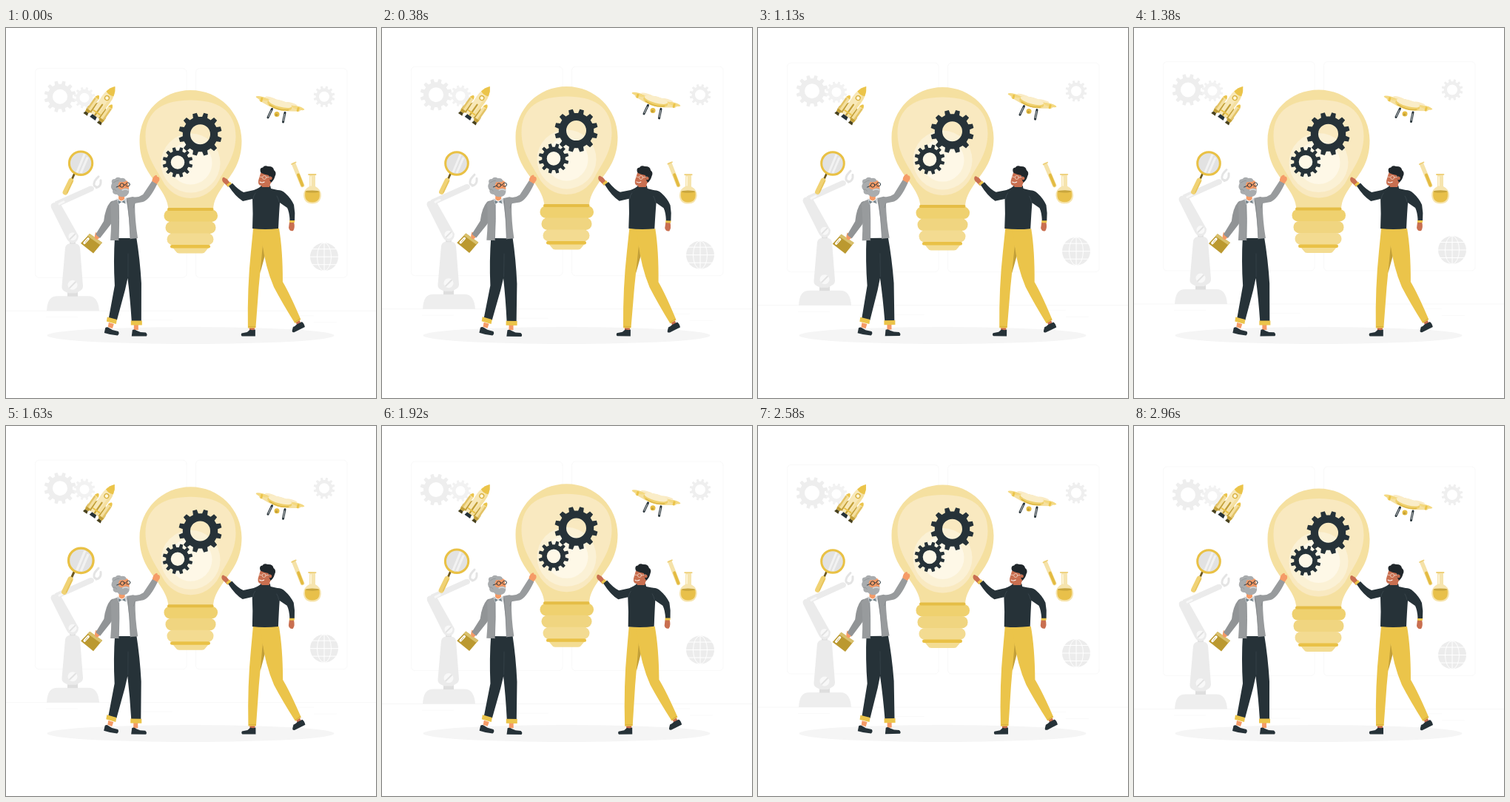
Animation, 500 px wide and 500 px high, one loop 3 s. Source, as an HTML page with a canvas:

```html
<!DOCTYPE html>
<html lang="en">
<head>
<meta charset="utf-8">
<title>Bright idea</title>
<style>
html, body { margin: 0; width: 100%; height: 100%; overflow: hidden; background: #fff; }
canvas { display: block; width: 500px; height: 500px; }
</style>
</head>
<body>
<canvas id="stage"></canvas>
<script>
const canvas = document.getElementById('stage');
const ctx = canvas.getContext('2d');
const dpr = window.devicePixelRatio || 1;
canvas.width = canvas.height = 500 * dpr;

const LOOP = 3000, LEAD = 40;
const DARK = '#263238', GOLD = '#ebc44a', DEEP = '#c29f38';
const PALE = '#f5e0a0', CREAM = '#faebc4', GREY = '#ebebeb';
const OLD = '#f59b67', YOUNG = '#c96f50';

function fill(d, color) { ctx.fillStyle = color; ctx.fill(new Path2D(d)); }
function line(d, color, w, cap = 'round') {
  ctx.strokeStyle = color;
  ctx.lineWidth = w;
  ctx.lineCap = cap;
  ctx.lineJoin = 'round';
  ctx.stroke(new Path2D(d));
}
function oval(x, y, rx, ry, color, turn = 0) {
  ctx.beginPath();
  ctx.ellipse(x, y, rx, ry, turn, 0, 7);
  ctx.fillStyle = color;
  ctx.fill();
}
const dot = (x, y, r, color) => oval(x, y, r, r, color);
function ring(x, y, r, color, w) {
  ctx.beginPath();
  ctx.arc(x, y, r, 0, 7);
  ctx.strokeStyle = color;
  ctx.lineWidth = w;
  ctx.stroke();
}
function box(x, y, w, h, r, color) {
  ctx.beginPath();
  ctx.roundRect(x, y, w, h, r);
  ctx.fillStyle = color;
  ctx.fill();
}
function group(dx, dy, draw) {
  ctx.save();
  ctx.translate(dx, dy);
  draw();
  ctx.restore();
}
function spin(x, y, deg, draw) {
  ctx.save();
  ctx.translate(x, y);
  ctx.rotate(deg * Math.PI / 180);
  ctx.translate(-x, -y);
  draw();
  ctx.restore();
}
function gear(x, y, outer, root, hole, color) {
  const n = 12, step = 2 * Math.PI / n;
  ctx.beginPath();
  for (let i = 0; i < n; i++) {
    const a = (i + 0.5) * step;
    for (const [off, r] of [[-0.29, root], [-0.19, outer], [0.19, outer], [0.29, root]]) {
      ctx.lineTo(x + r * Math.cos(a + off * step), y + r * Math.sin(a + off * step));
    }
  }
  ctx.closePath();
  ctx.moveTo(x + hole, y);
  ctx.arc(x, y, hole, 0, 7);
  ctx.fillStyle = color;
  ctx.fill('evenodd');
}

// Motion: linear swings between a few stops.
const rise = p => 1 - Math.abs(2 * p - 1);
function track(p, stops) {
  for (let i = 1; i < stops.length; i++) {
    const [a, u] = stops[i - 1], [b, v] = stops[i];
    if (p <= b) return u + (v - u) * (p - a) / (b - a);
  }
  return stops[stops.length - 1][1];
}
const sway = p => track(p, [[0, 0], [.25, 1], [.75, -1], [1, 0]]);
const beat = p => track(p, [[0, 1], [.14, 1.12], [.28, 1], [.42, 1.12], [.7, 1], [1, 1]]);

function backdrop() {
  ctx.strokeStyle = '#f9f9f9';
  ctx.lineWidth = 1;
  for (const x of [39.5, 256.5]) {
    ctx.beginPath();
    ctx.roundRect(x, 55, 204.5, 282.5, 5);
    ctx.stroke();
  }
  line('M0 382.5H500', '#f7f7f7', 1, 'butt');
  line('M54 391H97M170 395H225M382 389H416M416 398H447', '#fafafa', 1, 'butt');

  gear(73, 93, 21.5, 17, 10, '#eeeeee');
  gear(106, 94.5, 14.5, 11.3, 6.5, '#f2f2f2');
  gear(430, 93, 14.5, 11.3, 7, '#efefef');

  dot(430, 309.5, 19, '#ececec');
  line('M430 290V329M411 309.5H449M414 299H446M414 320H446', '#fff', 1);
  ctx.beginPath();
  ctx.ellipse(430, 309.5, 9.5, 19, 0, 0, 7);
  ctx.stroke();
}

function screw(x, y, r) {
  dot(x, y, r, '#f8f8f8');
  line(`M${x - r * .6} ${y + r * .6}L${x + r * .6} ${y - r * .6}`, '#e2e2e2', 2);
}
function robot() {
  fill('M55 382.5C56 368 60 362.5 70 362.5H111C121 362.5 125 370 126 382.5Z', '#eeeeee');
  box(83, 357, 14, 6, 0, '#dedede');
  fill('M80 297Q81 291 90 291Q99 291 100 297L104 349Q104 354 99 356L95 358.5H84L79 356Q75 354 75.5 349Z', GREY);
  box(86, 286, 8, 6, 1, '#e0e0e0');
  fill('M61 243Q59 237 66 236Q73 235 76 242L98 281Q98 289 91 291Q85 291 82 285Z', GREY);
  fill('M66 235L113 214Q118 213 119 217Q119 220 116 221L74 240Q67 242 66 235Z', GREY);
  line('M122 215Q117 214 120 207Q122 204 125 201M122 216Q127 215 128 210V206', '#e4e4e4', 3);
  line('M72 238L78 235', '#f7f7f7', 3);
  screw(90, 282, 5.5);
  screw(90, 347.5, 6.5);
}

function bulb() {
  fill('M249.5 84.5C211 84.5 180.5 115 180.5 153C180.5 182 193 197 205 213C214 226 218.5 234 219.5 246H280C280.5 234 285 226 294 213C306 197 318.5 182 318.5 153C318.5 115 288 84.5 249.5 84.5Z', PALE);
  fill('M249.5 98C214 98 188.5 111 188.5 147C189 174 202 189 211 206C219 222 234 230.5 249.5 230.5C265 230.5 280 222 288 206C297 189 310 174 310.5 147C310.5 111 285 98 249.5 98Z', '#f9e9c0');
  dot(249.5, 183, 40, '#fbf1d5');
  dot(249.5, 183, 29, '#fef8e7');
  gear(262.5, 144.2, 29.3, 23.8, 13.5, DARK);
  gear(232, 182, 20.5, 15.8, 9.3, DARK);

  box(213.5, 246, 72.5, 16.5, 8, '#efd16f');
  box(215.5, 262, 68, 16.5, 8, '#f0d580');
  box(217.5, 278, 63, 16, 8, '#f3db91');
  box(218, 243.5, 62.5, 4, 2, '#e5bd45');
  fill('M225 297H274L269 303Q268 305 265 305H234Q231 305 230 303Z', '#f3dc92');
  box(222, 293.5, 54, 4.5, 2.2, '#e9c146');
}

function oldMan(reach) {
  // shoes and legs
  fill('M139 398L146 400L144 406L138 404ZM173 400H179V408H173Z', OLD);
  fill('M134.5 405Q137 403.5 139 405L144 408L152 410Q154 413 151 415.5Q142 415 133 412Z', DARK);
  fill('M171 408Q174 406.5 177 409L182 411L189 411.5Q192 414 190 416.5H170Z', DARK);
  fill('M147 282H176Q181 312 183 345L183 397H170Q168 366 164.5 338L161 354L150 395L139 392L147 348Q145 315 147 282Z', DARK);
  line('M165 336V305', '#39464d', .7);
  fill('M137 390.5L150 394L149 400L136 396.5ZM169 395.5H184V401.5H169Z', GOLD);

  // book and resting arm
  fill('M113 278L130 290L118 304.5L101 291Z', '#bb9930');
  fill('M113 278L130 290L127 293L110 281Z', '#d9c06c');
  line('M106 290.5L111 285', '#fff', 3.4);
  line('M107 290L110 286', DEEP, .7);
  fill('M121 276L127 280Q127 285 122 286Q119 284 120 280Z', OLD);
  fill('M141 235Q147 231 150 238Q148 257 141 266L127 284L121 279L132 261Q134 243 141 235Z', '#919496');

  // shirt, raised arm and cardigan
  const up = 2 * reach;
  fill('M149 232L167 230Q171 256 169 284H150Z', '#fff');
  fill('M152 222H160V231Q156 236 152 231Z', OLD);
  fill('M146 233L152 231Q153 260 152 287L141 287Q143 260 141 238Z', '#989b9d');
  group(0, -up, () =>
    fill('M197 209Q197 202 201 199.5Q204 197.5 204 201Q208 201 207 206L203 212Z', OLD));
  fill(`M162 230L171 228Q178 230 185 225L197 ${207 - up}L204 ${211 - up}Q194 232 185 235L174 237Q174 260 178 284L168 285Q167 256 162 230Z`, '#989b9d');
  line('M152 233Q153 259 152 287M164 233Q167 257 168 285', '#83878a', .8);
  line('M174 237L172 243', '#83878a', .8);
  fill('M149 230L156 235L152 239ZM163 229L156 235L162 238Z', '#cfd3d6');
  fill('M151 233L156 235L152 237.5ZM156 235L160 233L161 237Z', '#728087');

  // head
  fill('M149 207Q156 202 164 207L166 216Q166 224 158 226Q150 226 149 218Z', OLD);
  fill('M143 210Q141 204 147 204Q150 200 155 203Q161 202 162 207Q157 209 153 208Q151 211 151 215Q153 219 157 218Q162 215 166 218Q167 226 160 228Q153 229 150 225Q143 225 144 219Q140 215 143 210Z', '#a9acae');
  line('M145 209Q149 206 152 206M144 218Q147 217 149 220', '#8f9395', .8);
  line('M157 219Q161 217 165 219', '#d8dadb', 1.5);
  ring(156.5, 212.5, 2.7, DARK, .9);
  ring(164.5, 211.5, 2.6, DARK, .9);
  line('M149 215L154 213M159 212H162', DARK, .9);
  line('M162 212V215', '#d97d4e', 1);
}

function youngMan(reach) {
  // shoes and legs
  fill('M329 403H336V410H329ZM391 396L396 393L399 400L394 403Z', YOUNG);
  fill('M330 407.5Q333 409 337 407.5V416.5H319Q317 415 318.5 412.5L326 411Z', DARK);
  fill('M388 404Q391 403 393 400.5L400 397Q403 399 404 404Q396 408 390 411Q386 412 387 408Z', DARK);
  fill('M346 288L350 307L343.5 331L342 318Z', DEEP);
  fill('M334 271H357L347 293Q341 350 337.5 405.5H327Q326 350 331 302Z', GOLD);
  fill('M344 271H369Q374 300 374 343Q384 360 398.5 394L390.5 399Q373 371 362 350Q350 322 346 288Z', GOLD);
  line('M328 403.5H337M391 397L397 393', '#d6af3a', 1);

  // far hand and arm
  fill('M383 262H389Q391 270 388 274Q383 275 382 270Z', YOUNG);
  box(383, 259, 7, 4, 1, GOLD);
  fill('M361 220Q371 217 377 223Q385 230 389 239Q391 250 390 260H383.5Q383 249 380 243L367 234Z', DARK);

  // raised arm and torso
  const dx = -1.5 * reach, dy = -3 * reach;
  group(dx, dy, () => {
    fill('M295 210Q291 207 292.5 203Q294 201 296 203Q299 204 300 206L304 211L300 215Z', YOUNG);
    fill('M298 212L303 208L305 211L300 215Z', GOLD);
  });
  fill(`M${301 + dx} ${214 + dy}L${306 + dx} ${210 + dy}Q314 219 321 222L335 219Q343 216 345 213H357L358 217L367 219Q372 224 370 236Q369 249 368 271Q350 273 333 271Q334 250 333 231L320 234Q310 228 ${301 + dx} ${214 + dy}Z`, DARK);
  line('M334 231Q334 227 337 223M369 235Q368 230 366 227', '#3b484f', .8);

  // head
  fill('M344 196Q349 192 358 195Q362 204 357 211L356 215H346L345 213Q340 213 341 206Z', YOUNG);
  fill('M344 195Q342 189 347 188.5Q349 185 354 187Q361 186.5 362 192Q366 195 363.5 200Q362 206 358 209L356 205L355 199Q349 198 345 196Z', '#20272b');
  ring(349, 202, 2.5, '#f0d9c9', .8);
  line('M342 201L345.5 201.5M352 202L357 201', '#f0d9c9', .8);
  dot(357.5, 203, 2.2, YOUNG);
  line('M343 208Q346 210 349 208', '#fff', 1);
}

function magnifier() {
  line('M93 196L89 205', '#6f5a1e', 2.8, 'butt');
  line('M88 206L80.5 221.5', '#f0d274', 6.8);
  line('M90 207L83 222', '#e6c35a', 1.5);
  dot(101, 183, 15.5, '#e2e2e2');
  line('M96 195L106 171M101 196L110 175', '#f2f2f2', 3, 'butt');
  ring(101, 183, 15.3, '#e9c145', 3);
}

function rocket() {
  ctx.save();
  ctx.translate(147.5, 79);
  ctx.rotate(35 * Math.PI / 180);
  for (const s of [-1, 1]) {
    ctx.save();
    ctx.scale(s, 1);
    fill('M6 30L14.5 42V48H6Z', DEEP);
    fill('M9 50H13.5L14.5 54H8Z', '#4a431f');
    fill('M8 27Q11 18 14 27V50H8Z', PALE);
    fill('M8 27Q11 18 14 27Z', GOLD);
    fill('M11.5 28H14V50H11.5Z', '#e3c367');
    fill('M8 46H14V50H8Z', DEEP);
    ctx.restore();
  }
  fill('M-3.5 47H3.5L4.5 53H-4.5Z', DARK);
  fill('M0 0Q7.5 9 7 22L6 48H-6L-7 22Q-7.5 9 0 0Z', '#f8e8b8');
  fill('M0 0Q7.5 9 7 22L6 48H2Q5 18 0 0Z', PALE);
  fill('M0 0Q4.5 5 6 12Q0 15 -6 12Q-4.5 5 0 0Z', GOLD);
  dot(0, 19, 3.6, '#d9b23f');
  dot(0, 19, 2.3, '#fff6db');
  line('M0 30V47', DEEP, 2.2);
  line('M-6 43H6', GOLD, 2, 'butt');
  ctx.restore();
}

function drone() {
  line('M359.5 110L354 121.5M377 115L374.5 127.5', DARK, 3);
  line('M358.5 112L354.5 120.5M376.5 117L375 126', '#fff', .8);
  ctx.save();
  ctx.translate(370, 104);
  ctx.rotate(15 * Math.PI / 180);
  fill('M-31 -2L-12 -5H12L31 -2L28 2L13 6H-13L-28 2Z', PALE);
  oval(-25, -2, 9, 2.2, '#f4d982');
  oval(25, -2, 9, 2.2, '#f4d982');
  oval(-14, -5, 8, 1.5, CREAM);
  oval(15, -5, 8, 1.5, CREAM);
  box(-27, -3, 3, 6, 1, GOLD);
  box(24, -3, 3, 6, 1, GOLD);
  oval(0, 1, 17, 6.5, '#efd06c');
  oval(0, -1.5, 16, 4.5, '#faedc8');
  line('M-13 4Q0 9 13 4', '#ddb745', 1.5);
  ctx.restore();
  dot(366, 117, 3.5, '#e6bd42');
  dot(365.5, 118, 1.7, DEEP);
}

function glassware() {
  line('M389 184.5L400.5 212.5', '#f5e2a8', 5.6);
  line('M395 198.5L400.5 212.5', '#e3bb42', 4);
  line('M386 184L391.5 181.5', '#eed07a', 1.8);
  fill('M410 198H418V214Q426 218 425.9 226.5Q425 237.5 414 237.5Q403 237.5 402.1 226.5Q402 218 410 214Z', '#f6e4ae');
  fill('M404.5 221H423.5Q426 235 414 235.5Q402 235 404.5 221Z', '#e8c04a');
  oval(414, 221, 9.5, 1.6, '#c9a63d');
  line('M409 198H418.5', '#eed07a', 1.8);
  line('M412 201V213', '#fff8e2', 1.5);
}

function draw(t) {
  const slow = t / LOOP, quick = t % 1500 / 1500;
  const high = rise(quick);
  ctx.setTransform(dpr, 0, 0, dpr, 0, 0);
  ctx.fillStyle = '#fff';
  ctx.fillRect(0, 0, 500, 500);

  group(0, -10 * rise(slow), () => { backdrop(); robot(); });
  oval(249.5, 415.5, 194, 11.5, '#f5f5f5');
  group(0, -10 * high, () => { bulb(); drone(); });
  group(-3 * high, 0, rocket);
  spin(406, 209, sway(quick), glassware);

  ctx.save();
  ctx.translate(98, 195);
  ctx.scale(beat(quick), beat(quick));
  ctx.translate(-98, -195);
  magnifier();
  ctx.restore();

  spin(154, 308, sway(quick), () => oldMan(high));
  spin(348, 300, sway(slow), () => youngMan(high));
}

const start = performance.now();
function tick(now) {
  draw((Math.max(0, now - start) + LEAD) % LOOP);
  requestAnimationFrame(tick);
}
tick(start);
</script>
</body>
</html>
```
